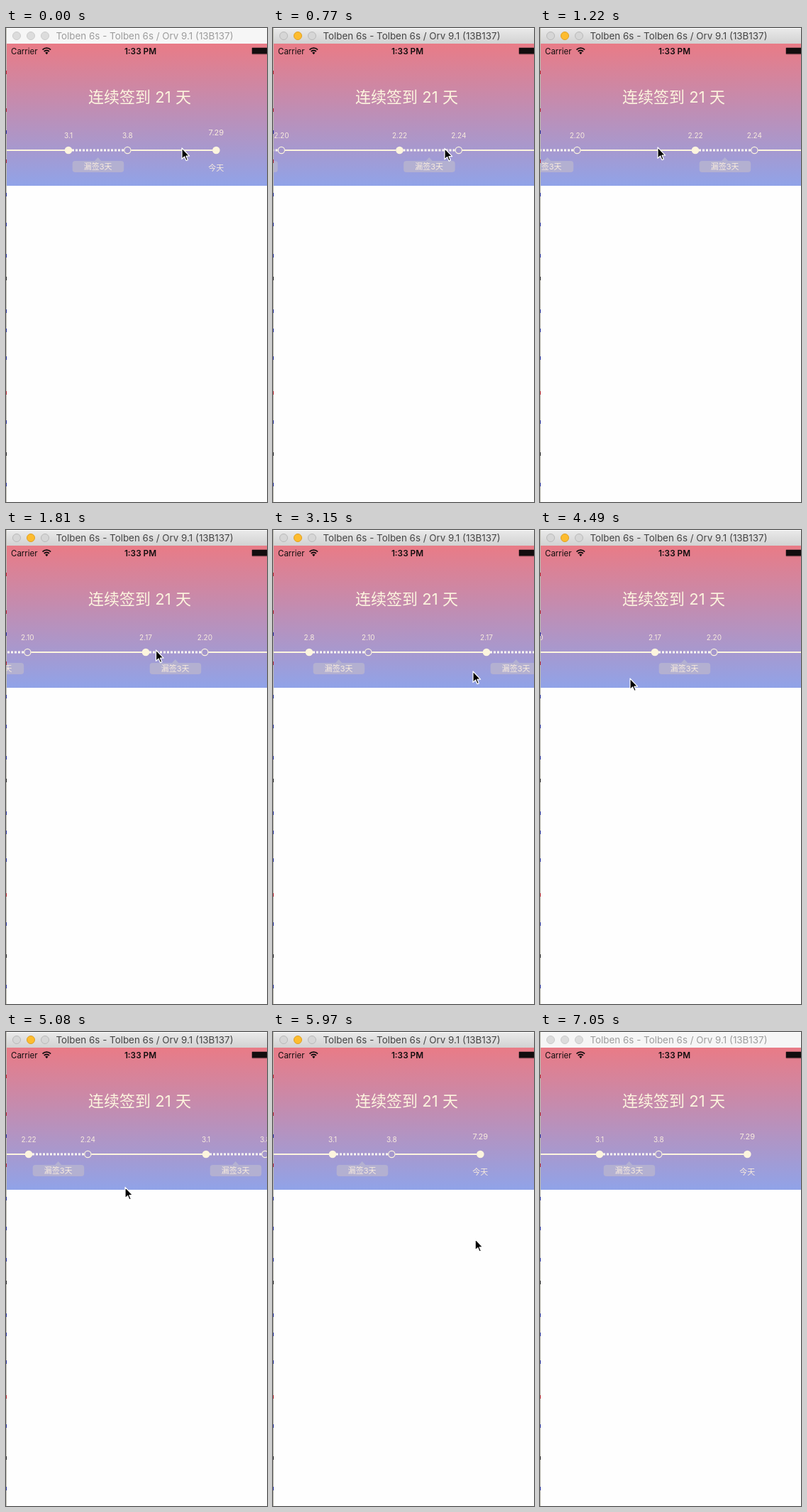
An HTML page for the animation above (7.62 s loop, 368x667 px).

```html
<!DOCTYPE html>
<html lang="zh-CN">
<head>
<meta charset="utf-8">
<title>Check-in timeline</title>
<style>
  html, body { margin: 0; width: 100%; height: 100%; overflow: hidden; background: #fefefe; }
  svg { display: block; width: 368px; height: 667px; }
  text { font-family: Inter, 'Noto Sans CJK SC', 'Noto Sans CJK JP', 'Noto Sans CJK', sans-serif; }
  .mid { text-anchor: middle; }
  .title { font-size: 13.4px; fill: #444; }
  .bar { fill: url(#chrome); }
  .light { fill: #d6d6d6; stroke: #b9b9b9; }
  .minimize { fill: #fdbc2f; stroke: #dfa023; }
  .inactive .title { fill: #9c9c9c; }
  .inactive .bar { fill: #f6f6f6; }
  .inactive .light { fill: #dcdcdc; stroke: #cbcbcb; }
  .cream { fill: #fdf5de; }
  .soft { fill: #f8ebdd; }
  .rail { stroke: #fdf5de; stroke-width: 2; }
  .dots { stroke: #fffaf2; stroke-width: 3; stroke-dasharray: 3 2; }
  .tip { fill: #b3b0d1; }
</style>
</head>
<body>
<svg id="stage" viewBox="0 0 368 667">
  <defs>
    <linearGradient id="sky" x2="0" y2="1">
      <stop stop-color="#e97b86"/>
      <stop offset="1" stop-color="#90a3e8"/>
    </linearGradient>
    <linearGradient id="chrome" x2="0" y2="1">
      <stop stop-color="#e9e9e9"/>
      <stop offset="1" stop-color="#d2d2d2"/>
    </linearGradient>
    <clipPath id="panel"><rect x="1" y="22" width="367" height="200"/></clipPath>
  </defs>
  <rect width="368" height="667" fill="#fefefe"/>
  <rect width="1" height="667" fill="#bdbcb2"/>
  <g id="edge"></g>
  <rect class="bar" x="1" y="1" width="367" height="21"/>
  <circle class="light" cx="15" cy="11" r="5.5"/>
  <circle class="light minimize" cx="35" cy="11" r="5.5"/>
  <circle class="light" cx="55" cy="11" r="5.5"/>
  <text class="title mid" x="195.5" y="16">Tolben 6s - Tolben 6s / Orv 9.1 (13B137)</text>

  <rect x="1" y="22" width="367" height="200" fill="url(#sky)"/>
  <g fill="#120d0e">
    <text x="7" y="36.5" font-size="11.5">Carrier</text>
    <text class="mid" x="189.5" y="36.5" font-size="11.8" font-weight="600">1:33 PM</text>
    <path d="M51.5 30.6a8.2 8.2 0 0 1 11.6 0M53.7 33a5.1 5.1 0 0 1 7.2 0" fill="none" stroke="#120d0e" stroke-width="1.8"/>
    <path d="M57.3 37.2l-2.1-2.4a3 3 0 0 1 4.2 0z"/>
    <rect x="346.5" y="27.5" width="26" height="9.5" rx="1.5" fill="none" stroke="#120d0e" stroke-width=".5" opacity=".5"/>
    <rect x="347" y="28" width="24" height="8.5"/>
  </g>
  <text class="cream mid" x="188.5" y="105" font-size="22" font-weight="300">连续签到 <tspan font-weight="400">21</tspan> 天</text>
  <g clip-path="url(#panel)"><g id="track"></g></g>
  <path id="cursor" d="M0 0V15.4L3.6 12L6 17.6L8.3 16.6L6 11.2H10.6Z" fill="#000" stroke="#fff" stroke-width="1.2" stroke-linejoin="round"/>
</svg>
<script>
const LOOP = 7620, TICK = 148.9, CELL = 250 / 3, RAIL_Y = 172;
const $ = id => document.getElementById(id);

const days = ['2.8', '2.10', '2.17', '2.20', '2.22', '2.24', '3.1', '3.8', '7.29'];
const last = days.length - 1;
// gaps alternate one cell (missed days) and two cells; today's cell is narrower on its left
const dayX = i => CELL * (3 * Math.floor(i / 2) + i % 2 - (i === last ? .5 : 0));

const line = (cls, a, b) => `<line class="${cls}" x1="${a}" x2="${b}" y1="${RAIL_Y}" y2="${RAIL_Y}"/>`;
const label = (x, y, size, str) =>
  `<text class="soft mid" x="${x}" y="${y}" font-size="${size}">${str}</text>`;
const tip = x => `<path class="tip" d="M${x - 5} 187.5l5-5.5l5 5.5z"/>
  <rect class="tip" x="${x - 36}" y="187" width="72.5" height="16" rx="4"/>${label(x, 199, 11, '漏签3天')}`;

function buildTrack() {
  let rails = line('rail', -400, -5), nodes = '';
  days.forEach((name, i) => {
    const x = dayX(i), next = dayX(i + 1), opens = i % 2 === 0;
    if (i < last) {
      rails += opens ? line('dots', x + 5, next - 5) + tip((x + next) / 2) : line('rail', x + 5, next - 5);
    }
    nodes += opens
      ? `<circle class="cream" cx="${x}" cy="${RAIL_Y}" r="5.3"/>`
      : `<circle cx="${x}" cy="${RAIL_Y}" r="4.6" fill="#a497cd" stroke="#fdf5de" stroke-width="1.2"/>`;
    nodes += i === last ? label(x, 151, 11, name) + label(x, 201, 11, '今天') : label(x, 155, 10, name);
  });
  $('track').innerHTML = rails + nodes;
}

// slivers of the window behind, along the left border
function buildEdge() {
  let seed = 7, marks = '';
  const random = () => (seed = seed * 16807 % 2147483647) / 2147483647;
  for (let y = 60; y < 650; y += 25 + 30 * random()) {
    const color = ['#b3262e', '#222', '#26309a'][Math.floor(random() * 3)];
    marks += `<rect y="${Math.round(y)}" width="1" height="5" fill="${color}"/>`;
  }
  $('edge').innerHTML = marks;
}

// each move: first tick, last tick, where it ends
const scrolls = [[0, 8, -281], [8, 13, -47], [19, 21, 51], [22, 27, 58], [28, 30, -88], [31, 39, -666]];
const pointer = [[0, 2, 318, 171], [2, 8, 166, 168], [8, 12, 211.5, 169], [12, 13, 243, 186],
  [15, 17, 206, 157], [19, 21, 282, 199], [22, 27, 302, 199], [28, 30, 127, 209],
  [31, 34, 168, 218.5], [34, 39, 280, 231], [39, 46, 316, 655]];

const linear = p => p;
const decay = p => 1 - (1 - p) ** 2.28;

function follow(start, moves, tick, ease) {
  return moves.reduce((at, [from, to, ...end]) => {
    const p = ease(Math.min(1, Math.max(0, (tick - from) / (to - from))));
    return at.map((v, i) => v + (end[i] - v) * p);
  }, start);
}

// the screen refreshes once per tick
function draw() {
  const tick = Math.floor(performance.now() % LOOP / TICK);
  const [scroll] = follow([-662], scrolls, tick, decay);
  const [x, y] = follow([248, 169], pointer, tick, linear);
  const idle = tick < 1 || tick > 46;
  $('track').setAttribute('transform', `translate(${Math.round(scroll * 2) / 2})`);
  $('cursor').setAttribute('transform', `translate(${x} ${y})`);
  $('cursor').setAttribute('visibility', tick > 46 ? 'hidden' : 'visible');
  $('stage').setAttribute('class', idle ? 'inactive' : '');
  requestAnimationFrame(draw);
}

buildTrack();
buildEdge();
draw();
</script>
</body>
</html>
```
